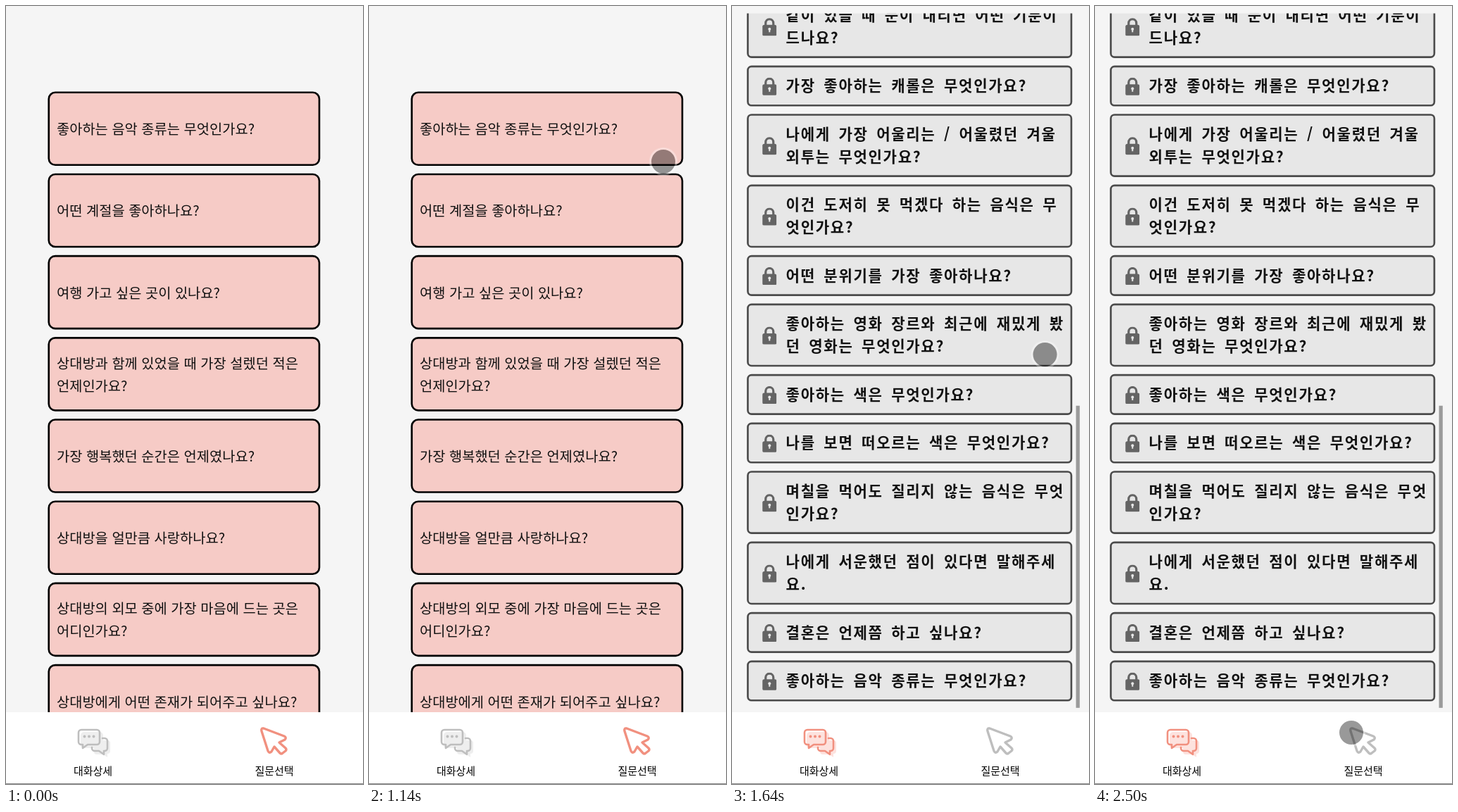
Recreate the animation shown at these times as an HTML page. Size 507 px wide and 1105 px high, loop 2950 ms.

```html
<!DOCTYPE html>
<html lang="ko">
<head>
<meta charset="utf-8">
<style>
html, body { margin: 0; width: 100%; height: 100%; overflow: hidden; background: #f5f5f5; }
body { position: relative; color: #111; font-family: "Noto Sans CJK KR", "Noto Sans KR", "Noto Sans CJK", sans-serif; }
/* The lists are laid out on a 384 px wide screen and enlarged to the stage. */
#screen { position: absolute; left: 0; top: 0; width: 384px; height: 837px; transform: scale(1.3203); transform-origin: 0 0; }
section { position: absolute; left: 0; top: 8px; width: 384px; height: 752px; overflow: hidden; }
.card { white-space: pre; box-sizing: border-box; display: flex; align-items: center; position: relative; line-height: 24px; }
#pick .card {
  position: absolute; left: 44.5px; width: 293px; height: 80px; padding-left: 8px;
  border: 2px solid #000; border-radius: 8px; background: #f6cbc6; font-size: 15px;
}
#chat .column { position: absolute; left: 16px; bottom: 12px; width: 350px; }
#chat .card {
  margin-top: 8px; padding: 8px 0 8px 40px;
  border: 2px solid #4b4b4b; border-radius: 5px; background: #e7e7e7;
  font-size: 16px; font-weight: 700; letter-spacing: 1.24px; word-spacing: 3.07px;
}
#chat .card span { position: relative; top: -.8px; }
.lock { position: absolute; left: 13.8px; top: 50%; width: 16.7px; height: 19.7px; margin-top: -9.5px; }
#thumb { position: absolute; left: 370.4px; width: 4px; bottom: 5px; background: #9b9b9b; }
nav { position: absolute; left: 0; top: 1003px; width: 507px; height: 102px; box-sizing: border-box; background: #fff; border-bottom: 1px solid #888; }
nav svg { position: absolute; left: 0; top: 0; }
nav b { position: absolute; top: 72px; width: 100px; text-align: center; font: 400 15px/22px "Noto Sans CJK KR", "Noto Sans KR", sans-serif; color: #000; }
.tab { --line: #bebebe; --tint: #eeeeee; }
.tab.on { --line: #f1907f; --tint: #fde2de; }
#dot {
  position: absolute; left: -17px; top: -17px; width: 34px; height: 34px; border-radius: 50%;
  background: rgba(0, 0, 0, .4); box-shadow: 0 0 0 3px rgba(255, 255, 255, .32);
}
</style>
</head>
<body>
<div id="screen">
  <section id="pick"></section>
  <section id="chat"><div class="column"></div><div id="thumb"></div></section>
</div>
<nav>
  <svg width="507" height="101" fill="none" stroke-width="2.6" stroke-linejoin="round" stroke-linecap="round">
    <g class="tab" id="chatTab">
      <g fill="var(--tint)">
        <rect x="106" y="28" width="32" height="23" rx="5"/>
        <path d="M128 40H144a4 4 0 0 1 4 4V55a4 4 0 0 1-4 4V64L138 60H129a4 4 0 0 1-4-4V44Z"/>
      </g>
      <g stroke="var(--line)">
        <path d="M107 25H129a4 4 0 0 1 4 4V42a4 4 0 0 1-4 4H116L109 51V46H107a4 4 0 0 1-4-4V29a4 4 0 0 1 4-4Z"/>
        <path d="M137 37H140a4 4 0 0 1 4 4V51a4 4 0 0 1-4 4H139V60L132 55H126a4 4 0 0 1-4-4V50"/>
        <path d="M111.500 34.500h.01M118 34.500h.01M124.500 34.500h.01" stroke-width="4"/>
      </g>
    </g>
    <path class="tab" id="pickTab" stroke="var(--line)" stroke-width="3.4"
      d="M366 23L395 34Q399 36 396 39L388 43L397 51Q399 53 397 55L393 58Q391 60 389 58L381 49L377 56Q374 59 372 55L363 27Q362 22 366 23Z"/>
  </svg>
  <b style="left:73.500px">대화상세</b>
  <b style="left:331px">질문선택</b>
</nav>
<div id="dot"></div>
<script>
const LOOP = 2950, SWITCH = 1160, APPEND = 1180;
const $ = id => document.getElementById(id);

const questions = [
  '좋아하는 음악 종류는 무엇인가요?', '어떤 계절을 좋아하나요?', '여행 가고 싶은 곳이 있나요?',
  '상대방과 함께 있었을 때 가장 설렜던 적은\n언제인가요?', '가장 행복했던 순간은 언제였나요?',
  '상대방을 얼만큼 사랑하나요?', '상대방의 외모 중에 가장 마음에 드는 곳은\n어디인가요?',
  '상대방에게 어떤 존재가 되어주고 싶나요?'
];
const history = [
  '나에게 하고 싶은 말을 자유롭게 해주세\n요!', '같이 있을 때 눈이 내리면 어떤 기분이\n드나요?',
  '가장 좋아하는 캐롤은 무엇인가요?', '나에게 가장 어울리는 / 어울렸던 겨울\n외투는 무엇인가요?',
  '이건 도저히 못 먹겠다 하는 음식은 무\n엇인가요?', '어떤 분위기를 가장 좋아하나요?',
  '좋아하는 영화 장르와 최근에 재밌게 봤\n던 영화는 무엇인가요?', '좋아하는 색은 무엇인가요?',
  '나를 보면 떠오르는 색은 무엇인가요?', '며칠을 먹어도 질리지 않는 음식은 무엇\n인가요?',
  '나에게 서운했던 점이 있다면 말해주세\n요.', '결혼은 언제쯤 하고 싶나요?', questions[0]
];
const lock = `<svg class="lock" viewBox="0 0 22 26"><path d="M5.500 11V7a5.500 5.500 0 0 1 11 0V11" fill="none" stroke="#646464" stroke-width="3.200"/>
  <rect x="1" y="9.500" width="20" height="16" rx="2.500" fill="#646464"/><path d="M11 16v4" stroke="#e7e7e7" stroke-width="2"/><circle cx="11" cy="15.500" r="2" fill="#e7e7e7"/></svg>`;

$('pick').innerHTML = questions.map((q, i) =>
  `<div class="card" style="top:${84 + 88 * i}px"><span>${q}</span></div>`).join('');
const column = document.querySelector('.column');
column.innerHTML = history.map(q => `<div class="card">${lock}<span>${q}</span></div>`).join('');
const added = column.lastElementChild;

// Pointer strokes as [time, x, y]; the pointer rests between them.
const strokes = [
  [[20, 364, 1032], [200, 432, 800], [380, 480, 360], [480, 474, 235], [560, 456, 230], [640, 434, 232], [740, 418, 221]],
  [[1480, 418, 221], [1640, 444.5, 495], [1820, 364, 1032]]
];

function along(pts, t) {
  const last = pts.length - 1;
  if (t >= pts[last][0]) return pts[last].slice(1);
  let i = 0;
  while (t >= pts[i + 1][0]) i++;
  const slope = (k, c) => k === 0 || k === last ? 0
    : (pts[k + 1][c] - pts[k - 1][c]) / (pts[k + 1][0] - pts[k - 1][0]);
  const a = pts[i], b = pts[i + 1], d = b[0] - a[0], u = (t - a[0]) / d, v = 1 - u;
  return [1, 2].map(c => v * v * (1 + 2 * u) * a[c] + u * u * (3 - 2 * u) * b[c]
    + d * u * v * (v * slope(i, c) - u * slope(i + 1, c)));
}

function draw(now) {
  const t = now % LOOP, chatting = t >= SWITCH, full = t >= APPEND;
  $('pick').style.display = chatting ? 'none' : '';
  $('chat').style.display = chatting ? '' : 'none';
  $('chatTab').classList.toggle('on', chatting);
  $('pickTab').classList.toggle('on', !chatting);
  added.style.display = full ? '' : 'none';
  $('thumb').style.height = (full ? 325 : 320.5) + 'px';
  $('dot').style.visibility = t < 20 ? 'hidden' : '';
  // The pointer is sampled every 20 ms and rests until its next stroke begins.
  const time = Math.max(20, Math.floor(t / 20) * 20);
  const [x, y] = along(strokes[time < 1480 ? 0 : 1], time);
  $('dot').style.transform = `translate(${x}px,${y}px)`;
}

const start = performance.now();
function tick() {
  draw(performance.now() - start);
  requestAnimationFrame(tick);
}
tick();
</script>
</body>
</html>
```
